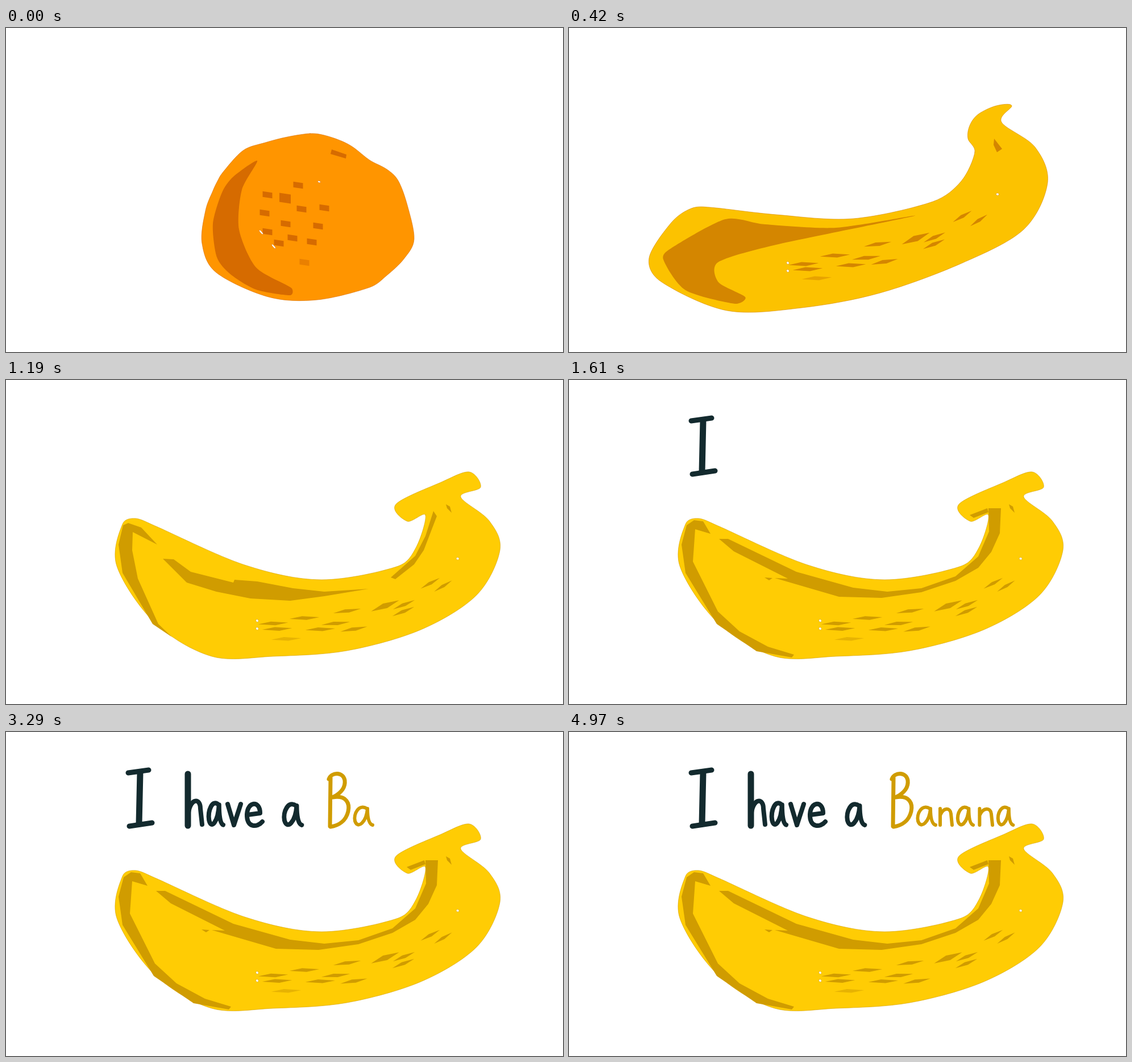
Write an HTML page with a canvas that moves like this. It is 980 px wide and 571 px high and loops after 5.39 s.

```html
<!DOCTYPE html>
<html lang="en">
<head>
<meta charset="utf-8">
<title>I have a Banana</title>
<style>
html, body { margin: 0; width: 100%; height: 100%; overflow: hidden; background: #fff; }
canvas { display: block; }
</style>
</head>
<body>
<canvas id="stage" width="980" height="571" role="img" aria-label="I have a Banana"></canvas>
<script>
const ctx = document.getElementById('stage').getContext('2d');
const LOOP = 5390;

// Outlines with matching points, from orange to banana.
const round = [535,186, 560,189, 590,199, 612,211, 640,233, 670,249, 690,269, 706,312,
  718,372, 700,407, 670,436, 640,457, 548,479, 462,474, 370,431, 345,380,
  351,322, 364,287, 372,270, 381,255, 417,216, 456,202, 495,192];
const stretched = [692,142, 722,119, 745,108, 798,97, 850,104, 882,108, 892,135, 880,215,
  855,285, 810,348, 730,408, 650,452, 548,479, 462,474, 370,430, 345,380,
  352,325, 380,289, 402,275, 427,259, 510,226, 604,192, 650,168];
const curled = [714,219, 702,195, 705,172, 720,152, 752,137, 779,137, 761,166, 820,210,
  842,273, 800,355, 690,415, 547,467, 410,493, 278,498, 162,447, 141,405,
  180,343, 215,318, 248,316, 365,329, 500,336, 640,306, 690,270];
const banana = [738,238, 706,249, 686,219, 766,180, 815,162, 835,189, 800,206, 850,248,
  869,300, 828,379, 730,440, 600,477, 470,487, 362,487, 262,428, 195,328,
  205,254, 228,244, 262,257, 420,326, 555,352, 690,328, 722,294];
const BODY = [round, stretched, curled, banana];

const mapPoints = (p, f) => p.flatMap((x, i) => i % 2 ? [] : f(x, p[i + 1]));
// How inner details travel while stretching and while settling.
const stretch = p => mapPoints(p, (x, y) =>
  [687 + 1.75 * (x - 514) - .98 * (y - 277), 250 - .3 * (x - 514) + 1.13 * (y - 277)]);
const settle = p => mapPoints(p, (x, y) => {
  const far = Math.max(0, x - 680);
  return [x + 57 - far * .22, y + 13 + Math.min(14, (x - 413) * .1) - far * .07];
});

const crescent = [442,234, 400,262, 380,290, 364,345, 371,404, 395,434,
  440,461, 500,471, 502,458, 440,422, 410,355, 415,285];
const leaning = [572,231, 470,262, 412,292, 376,345, 380,408, 400,432,
  445,462, 502,470, 507,457, 455,422, 439,375, 485,288];
const swoosh = [608,331, 470,352, 345,346, 275,337, 180,388, 166,408,
  205,462, 292,486, 310,474, 263,448, 262,413, 360,383];
const lifted = mapPoints(swoosh, (x, y) => [x + 52, y + 20 - Math.max(0, 400 - x) * .35]);
const SHADE = [crescent, leaning, swoosh, lifted];

const spots = [514,277, 460,294, 491,300, 520,319, 560,317, 455,326, 492,345,
  549,349, 460,359, 504,370, 538,377, 480,379, 525,413];
const streaks = [692,332, 543,381, 610,371, 643,369, 721,339, 468,401, 523,405,
  642,381, 413,416, 496,418, 555,412, 420,425, 436,441];
const FLECKS = [spots, stretch(spots), streaks, settle(streaks)];
const BIG = 2, FAINT = 12;

const pores = [551,271, 449,360, 471,385];
const dots = [754,293, 385,414, 385,428];
const HOLES = [pores, stretch(pores), dots, settle(dots)];

const STEM_MARK = [
  [573,214, 599,223, 598,230, 571,222], [801,120, 797,136, 769,138, 786,123],
  [748,195, 762,213, 753,219, 747,206], [774,219, 781,223, 784,234, 776,226]
];
const FILL = [[255,149,0], [255,149,0], [252,194,0], [255,204,4]];
const DARK = [[214,107,0], [214,107,0], [212,134,0], [208,156,0]];

// [start time, pose]
const STEPS = [[0,0], [140,.33], [210,.67], [280,1], [350,1.5], [420,2], [490,2.3], [560,2.6], [770,3]];

// Brush shading on the finished banana.
const LEFT_ROUGH = [206,256, 215,252, 238,260, 266,290, 223,268, 222,300, 232,350,
  268,430, 292,453, 258,430, 205,340, 198,290];
const BAND_ROUGH = [276,315, 295,316, 325,338, 400,357, 402,352, 442,355, 505,367, 560,373,
  638,368, 560,381, 500,389, 430,385, 370,373, 318,357];
const RIGHT_ROUGH = [752,231, 758,240, 735,300, 718,325, 685,351, 677,348, 720,310, 738,275];
const LEFT = [207,256, 220,247, 236,249, 249,271, 222,263, 218,320, 262,408,
  300,443, 350,470, 396,484, 392,489, 330,478, 260,430, 205,340, 198,290];
const BAND = [264,280, 280,280, 400,338, 500,366, 560,373, 620,367, 680,346, 720,311, 739,267,
  738,226, 760,226, 758,270, 743,303, 720,331, 680,354, 620,374, 550,384, 475,382,
  362,349, 385,350, 290,302];

const INK = '#132a2e', GOLD = 'rgb(208,156,0)';
const A = 'M25 6C11-3 1 15 4 28C9 43 24 30 26 6C26 20 28 33 35 35';
const N = 'M5 6V35M5 18C11 3 23 4 24 15L26 35';

function letter(start, color, width, path, x = 0, y = 0, sx = 1, sy = 1) {
  const shape = new Path2D();
  shape.addPath(new Path2D(path), new DOMMatrix([sx, 0, 0, sy, x, y]));
  return { start, color, width, shape };
}
const WRITING = [
  letter(1610, INK, 9, 'M215 72L251 67M217 166L257 160'),
  letter(1610, INK, 11, 'M236 71L234 162'),
  letter(2030, INK, 11, 'M320 74V165'),
  letter(2030, INK, 8, 'M321 142C325 116 342 116 342 135L345 163'),
  letter(2030, INK, 8, A, 354, 121, .8, 1.22),
  letter(2030, INK, 8, 'M390 127L401 164L413 127'),
  letter(2030, INK, 8, 'M425 146L447 143C447 120 425 122 424 145C423 169 442 169 451 158'),
  letter(2450, INK, 8, A, 486, 123, .98, 1.17),
  letter(2870, GOLD, 7, 'M571 81L570 166M568 83C573 70 593 70 596 85C598 102 583 111 575 115C600 111 605 127 602 140C598 157 585 165 571 167'),
  ...[[610, A, 1], [648, N, 1], [681, A, .86], [717, N, 1.08], [752, A, .84]]
    .map(([x, path, sx], i) => letter(3290 + 420 * i, GOLD, 6, path, x, 129, sx))
];

function blend(poses, pose) {
  const i = Math.min(2, Math.floor(pose)), t = pose - i;
  return poses[i].map((v, k) => v + (poses[i + 1][k] - v) * t);
}

const rgb = c => `rgb(${c.map(Math.round)})`;

function fillPoly(p) {
  ctx.beginPath();
  for (let i = 0; i < p.length; i += 2) ctx.lineTo(p[i], p[i + 1]);
  ctx.closePath();
  ctx.fill();
}

// Closed cardinal spline.
function smooth(p, k) {
  const n = p.length, at = i => p[(i + n) % n];
  ctx.beginPath();
  ctx.moveTo(p[0], p[1]);
  for (let i = 0; i < n; i += 2) {
    const x = at(i + 2), y = at(i + 3);
    // Limit handles so short edges next to long ones do not loop.
    const len = Math.hypot(x - p[i], y - p[i + 1]);
    const handle = (dx, dy) => {
      const s = Math.min(k, .4 * len / (Math.hypot(dx, dy) || 1));
      return [dx * s, dy * s];
    };
    const [ax, ay] = handle(x - at(i - 2), y - at(i - 1));
    const [bx, by] = handle(at(i + 4) - p[i], at(i + 5) - p[i + 1]);
    ctx.bezierCurveTo(p[i] + ax, p[i + 1] + ay, x - bx, y - by, x, y);
  }
  ctx.closePath();
}

// Parallelograms that grow longer, thinner and more slanted from pose to pose.
function fleckShape(i, pose) {
  const x = FLECKS[pose][2 * i], y = FLECKS[pose][2 * i + 1];
  const bend = pose === 2 ? 500 : 560, past = Math.max(0, x - bend);
  const long = Math.max(1.7, 3.1 - past * .006);
  const w = (i === BIG ? 10 : 8.5) * [1, 1.95, long, long][pose];
  const h = (i === BIG ? 8 : 5) * [1, 1.1, .65, .6][pose];
  const slope = pose > 1 ? .06 - past * .0024 : [.15, -.04][pose];
  const skew = [0, .6, .85, .85][pose] * w;
  return [[-w, h], [skew - w, -h], [w, -h], [w - skew, h]]
    .flatMap(([a, b]) => [x + a, y + b + a * slope]);
}
const fleckPoses = Array.from({ length: 13 }, (_, i) => [0, 1, 2, 3].map(pose => fleckShape(i, pose)));

function drawShade(t, pose) {
  if (t < 770) {
    smooth(blend(SHADE, pose), .13);
    ctx.fill();
  } else if (t < 1610) {
    fillPoly(LEFT_ROUGH);
    fillPoly(BAND_ROUGH);
    if (t < 1190) fillPoly([225,262, 330,308, 500,366, 325,340]);
    else fillPoly(RIGHT_ROUGH);
  } else {
    fillPoly(LEFT);
    fillPoly(BAND);
    fillPoly([344,348, 358,349, 352,353]);
    fillPoly([705,238, 736,226, 738,233, 712,243]);
  }
}

function drawFruit(t) {
  const pose = STEPS.filter(s => s[0] <= t).pop()[1];
  smooth(blend(BODY, pose), .16);
  ctx.fillStyle = rgb(blend(FILL, pose));
  ctx.fill();
  ctx.strokeStyle = ctx.fillStyle = rgb(blend(DARK, pose));
  ctx.lineWidth = .6;
  ctx.stroke();

  drawShade(t, pose);
  fillPoly(blend(STEM_MARK, pose));
  fleckPoses.forEach((poses, i) => {
    ctx.globalAlpha = i === FAINT ? .5 : 1;
    fillPoly(blend(poses, pose));
  });
  ctx.globalAlpha = 1;

  const holes = blend(HOLES, pose);
  ctx.fillStyle = '#fff';
  for (let i = 0; i < holes.length; i += 2) {
    const long = i && pose < 2 ? 5 - pose : 2.6;
    ctx.beginPath();
    ctx.ellipse(holes[i], holes[i + 1], long, pose < 2 ? 1.5 : 2.2, i ? .85 : .3, 0, 7);
    ctx.fill();
    ctx.stroke();
  }
}

function drawWriting(t) {
  ctx.lineCap = ctx.lineJoin = 'round';
  for (const { start, color, width, shape } of WRITING) {
    if (t < start) break;
    ctx.strokeStyle = color;
    ctx.lineWidth = width;
    ctx.stroke(shape);
  }
}

function draw(t) {
  ctx.fillStyle = '#fff';
  ctx.fillRect(0, 0, 980, 571);
  drawFruit(t);
  drawWriting(t);
}

const begin = performance.now();
function tick() {
  draw((performance.now() - begin) % LOOP);
  requestAnimationFrame(tick);
}
tick();
</script>
</body>
</html>
```
